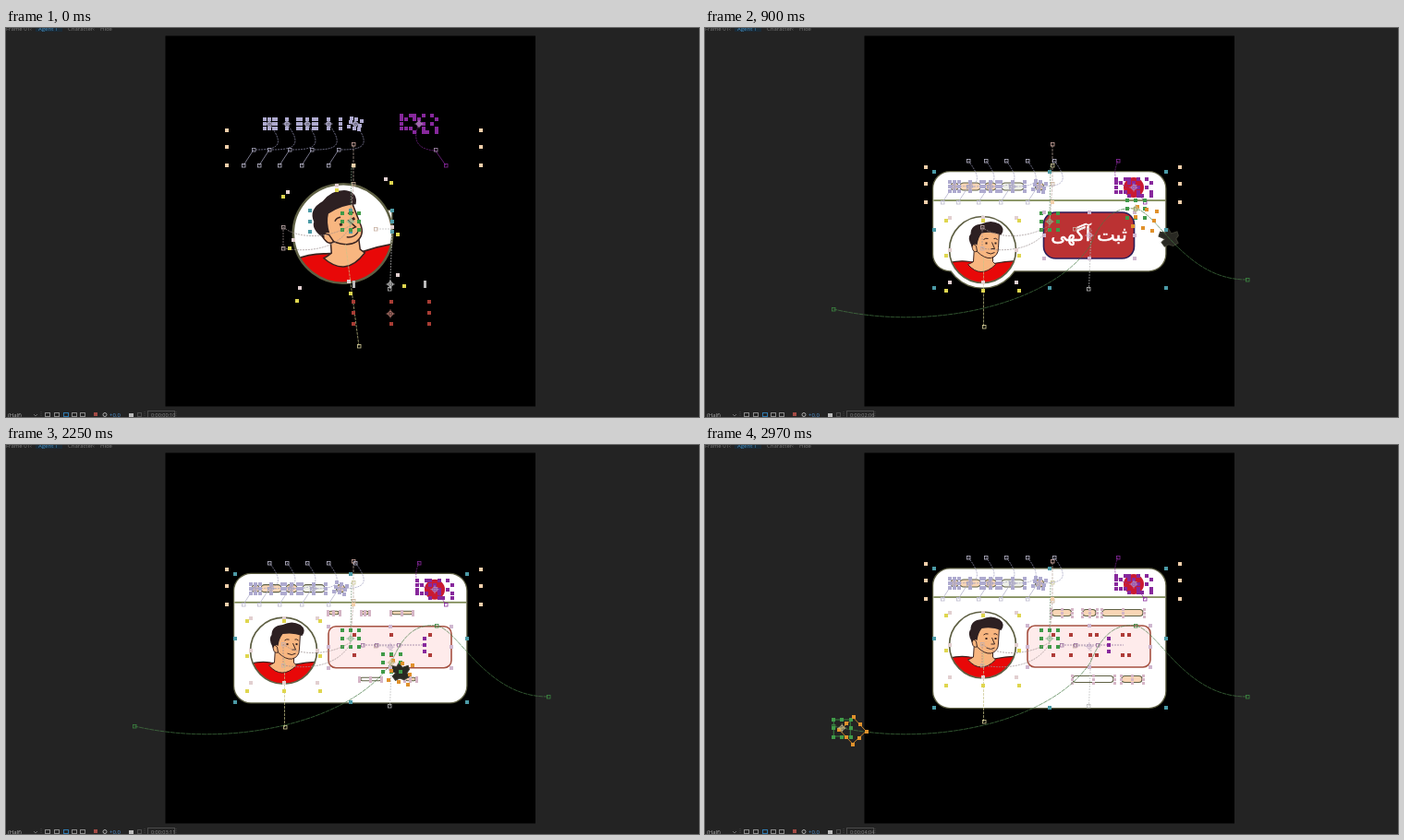
These frames come from a looping animation (750x422 px, 3.09 s). An HTML page with a canvas:

```html
<!DOCTYPE html>
<html lang="en">
<head>
<meta charset="utf-8">
<title>Card animation preview</title>
<style>
html, body { margin: 0; width: 100%; height: 100%; overflow: hidden; background: #232323; }
canvas { display: block; }
</style>
</head>
<body>
<canvas id="stage" width="750" height="422"></canvas>
<script>
const ctx = document.getElementById('stage').getContext('2d');
const LOOP = 3090, LAST = 2970, STEP = 30;
const OLIVE = '#5f6044', PEACH = '#f9d6b6', LILAC = '#aeaacf', PURPLE = '#87289c', GREEN = '#3f9a48', ORANGE = '#e0912b';
const TAU = Math.PI * 2;

const clamp = v => Math.max(0, Math.min(1, v));
const mix = (a, b, p) => a + (b - a) * p;
const linear = p => p;
const smooth = p => p * p * (3 - 2 * p);
const quadInOut = p => p < .5 ? 2 * p * p : 1 - 2 * (1 - p) ** 2;
const cubicOut = p => 1 - (1 - p) ** 3;
const ramp = (t, start, length, ease = smooth) => ease(clamp((t - start) / length));
const blend = (a, b, p) => `rgb(${a.map((v, i) => Math.round(mix(v, b[i], p)))})`;

// Value between [time, value] keys.
function track(t, keys, ease = smooth) {
  if (t <= keys[0][0]) return keys[0][1];
  for (let i = 1; i < keys.length; i++) {
    const [t0, a] = keys[i - 1], [t1, b] = keys[i];
    if (t < t1) return mix(a, b, ease((t - t0) / (t1 - t0)));
  }
  return keys[keys.length - 1][1];
}

function bezier([a, b, c, d], u) {
  const v = 1 - u;
  return [0, 1].map(k => v * v * v * a[k] + 3 * v * v * u * b[k] + 3 * v * u * u * c[k] + u * u * u * d[k]);
}

function dot(x, y, color, size = 4) {
  ctx.fillStyle = color;
  ctx.fillRect(Math.round(x - size / 2), Math.round(y - size / 2), size, size);
}

function hollow(x, y, color) {
  ctx.strokeStyle = color;
  ctx.lineWidth = .8;
  ctx.strokeRect(Math.round(x) - 1.5, Math.round(y) - 1.5, 3.5, 3.5);
}

function anchor(x, y, color = '#ccc') {
  ctx.strokeStyle = color;
  ctx.lineWidth = .9;
  ctx.beginPath();
  ctx.arc(x, y, 2.5, 0, TAU);
  ctx.moveTo(x - 4.5, y); ctx.lineTo(x + 4.5, y);
  ctx.moveTo(x, y - 4.5); ctx.lineTo(x, y + 4.5);
  ctx.stroke();
}

// Eight handles around a box, optionally turned.
function handles(cx, cy, rx, ry, color, size = 4, turn = 0) {
  const c = Math.cos(turn), s = Math.sin(turn);
  for (let i = -1; i < 2; i++) for (let j = -1; j < 2; j++) {
    if (i || j) dot(cx + i * rx * c - j * ry * s, cy + i * rx * s + j * ry * c, color, size);
  }
}

function line(points, color, dash = []) {
  ctx.strokeStyle = color;
  ctx.lineWidth = .7;
  ctx.setLineDash(dash);
  ctx.beginPath();
  points.forEach(([x, y]) => ctx.lineTo(x, y));
  ctx.stroke();
  ctx.setLineDash([]);
}

function route(curve, color, dash = [2, 1]) {
  line(Array.from({ length: 31 }, (_, i) => bezier(curve, i / 30)), color, dash);
}

function rounded(x, y, w, h, r) {
  ctx.beginPath();
  ctx.roundRect(x, y, w, h, Math.min(r, w / 2, h / 2));
}

function pill(x, y, w, h, fill = PEACH) {
  rounded(x - w / 2, y - h / 2, w, h, h / 2);
  ctx.fillStyle = fill;
  ctx.fill();
  ctx.strokeStyle = OLIVE;
  ctx.lineWidth = 1.2;
  ctx.stroke();
}

function label(text, x, y, color, font = '6px "Open Sans", sans-serif') {
  ctx.font = font;
  ctx.fillStyle = color;
  ctx.textAlign = 'left';
  ctx.textBaseline = 'alphabetic';
  ctx.fillText(text, x, y);
}

function shape(path, fill, stroke, width = 1.2) {
  const p = new Path2D(path);
  if (fill) { ctx.fillStyle = fill; ctx.fill(p); }
  if (stroke) { ctx.strokeStyle = stroke; ctx.lineWidth = width; ctx.stroke(p); }
}

function drawWorkspace(t) {
  ctx.fillStyle = '#232323';
  ctx.fillRect(0, 0, 750, 422);
  ctx.fillStyle = '#000';
  ctx.fillRect(172.5, 8.5, 400.5, 402);

  ctx.fillStyle = '#1a2a36';
  ctx.fillRect(32, 0, 29, 4);
  label('Frame 01', 0, 3, '#777');
  label('‹', 26, 3, '#777');
  label('Agent 1', 35, 3, '#4590c4');
  label('Character', 67, 3, '#777');
  label('‹', 94, 3, '#777');
  label('Hide', 102, 3, '#777');

  label('(Half)', 2, 422, '#aaa');
  line([[30, 419], [32, 421], [34, 419]], '#888');
  [38, 150, 184].forEach(x => line([[x, 416], [x, 422]], '#555', [1, 1]));
  [45, 55, 65, 74, 83].forEach((x, i) => {
    ctx.strokeStyle = i === 2 ? '#2f78ad' : '#8a8a8a';
    ctx.lineWidth = 1;
    ctx.strokeRect(x - 2.5, 417.5, 5, 4);
  });
  dot(97, 419, '#a44a44', 4);
  ctx.beginPath();
  ctx.arc(107, 419.5, 2, 0, TAU);
  ctx.strokeStyle = '#aaa';
  ctx.stroke();
  label('+0.0', 112, 422, '#4d8fd0');
  dot(135, 420, '#bbb', 5);
  ctx.strokeStyle = '#4a4a4a';
  ctx.strokeRect(142.5, 417.5, 4, 4);
  ctx.strokeRect(153.5, 415.5, 29, 8);
  const n = Math.round(track(t, [[0, 10], [480, 41], [720, 52], [900, 66], [1590, 80], [1950, 92], [2430, 106], [2970, 124]], linear));
  label(`0:00:0${Math.floor(n / 30)}:${String(n % 30).padStart(2, '0')}`, 157, 421.5, '#888', '5.5px "Open Sans", sans-serif');
}

function drawMan(tilt) {
  const ink = '#3a2420', skin = '#f8b680';
  ctx.save();
  ctx.beginPath();
  ctx.arc(0, 0, 36, 0, TAU);
  ctx.fillStyle = '#fff';
  ctx.fill();
  ctx.clip();
  shape('M-40 15 Q-26 11 -14 13 L12 15 Q26 12 40 12 V40 H-40Z', '#e80808', ink);
  shape('M-9 -4 L-10 13 Q-13 15 -16 16 Q-2 32 14 16 L11 13 L11 2Z', skin, ink, 1);

  ctx.translate(3, 8);
  ctx.rotate(tilt);
  ctx.translate(-3, -8);
  shape('M-10 -18 Q-11 -4 -6 2 Q2 10 9 9 Q17 7 17 -2 L18 -19 Q3 -26 -10 -18Z', skin, ink, 1);
  shape('M-7 -4 Q-14 -10 -11 -1 Q-10 3 -6 2Z', skin, ink, 1);
  shape('M-12 -4 Q-17 -13 -13 -17 Q-13 -27 -1 -28 Q9 -33 18 -28 Q25 -23 20 -16 Q10 -20 -1 -18 Q-5 -13 -6 -5 Q-10 -8 -11 -3Z', '#2d2022');
  shape('M1 -11 Q3 -13 6 -12 M12 -12 Q14 -13 16 -11 M10 -8 L13 -1 L9 -1 M4 3 Q9 6 13 3', null, ink, 1);
  dot(4, -7, ink, 2);
  dot(14, -7, ink, 2);
  ctx.restore();
  ctx.beginPath();
  ctx.arc(0, 0, 36, 0, TAU);
  ctx.strokeStyle = OLIVE;
  ctx.lineWidth = 1.7;
  ctx.stroke();
}

const chipStarts = [285, 304, 326, 349, 378];
const chipEnds = [270, 287, 309, 333, 362];
const chipWidths = [8, 22, 12, 24, 9];
const chipRoute = (i, h) => {
  const s = chipStarts[i], e = chipEnds[i];
  return [[s, h - 43], [s + 20, h - 17], [e + 20, h - 15], [e, h - 15]];
};
const badgeRoute = h => [[447, h - 43], [437, h - 20], [452, h - 15], [464, h - 14]];

const trail = [
  [[587, 273], [520, 274], [490, 200], [466, 196]],
  [[466, 196], [440, 193], [427, 212], [417, 236]],
  [[417, 236], [375, 300], [245, 330], [139, 305]]
];
const along = v => {
  const i = Math.min(2, Math.floor(v));
  return bezier(trail[i], v - i);
};

// x, y, width, lag, fill
const details = [
  [386, 182, 21, 17, PEACH], [416, 182, 14, 13, PEACH], [452, 182, 44, 9, PEACH],
  [420, 254, 44, 11, '#fff'], [462, 254, 22, 10, PEACH]
];

// Seeded grid positions for the dense vertex cluster.
let seed = 11;
const random = () => (seed = seed * 16807 % 2147483647) / 2147483647;
const vertices = Array.from({ length: 30 }, () => [Math.round(random() * 8 - 4) * 4.7, Math.round(random() * 5 - 2.5) * 4.7]);

function pose(t) {
  const open = ramp(t, 2010, 360);
  const grow = ramp(t, 60, 270, cubicOut);
  const go = ramp(t, 60, 360);
  const line = track(t, [[0, 147], [90, 147], [520, 187]]) - 22 * open;
  const man = bezier([[364.5, 223], [350, 244], [325, 243], [300.5, 240.5]], go);
  man[1] -= 23.5 * open;
  const travel = start => track(t, [[300, .04], [720, .1], [899, .1], [900, start], [1410, 2]], linear) + ramp(t, 2310, 750, quadInOut);
  return {
    line, open, grow, man,
    manScale: mix(1.49, 1, go),
    manTurn: mix(-.13, 0, go),
    manTilt: mix(-.3, 0, go),
    cardW: mix(89, 251, grow),
    cardH: mix(23, mix(107, 150.5, open), grow),
    chips: chipEnds.map((_, i) => bezier(chipRoute(i, line), ramp(t, 336 + i * 34, 250, cubicOut))),
    badge: bezier(badgeRoute(line), ramp(t, 400, 270, cubicOut)),
    buttonW: track(t, [[270, 0], [420, 98], [1770, 98], [1950, 75], [2010, 75], [2250, 133]]),
    buttonH: track(t, [[270, 0], [420, 47], [570, 50], [1770, 50], [1950, 38], [2010, 38], [2250, 45]]),
    buttonY: track(t, [[270, 278], [480, 229], [570, 225], [2010, 225], [2310, 218.5]]),
    words: track(t, [[270, 0], [420, 1], [1770, 1], [1950, .59], [2070, 0]]),
    cursor: travel(1),
    glyph: travel(.67)
  };
}

function drawCard(p) {
  const top = 209.7 - p.cardH / 2, left = 372.7 - p.cardW / 2;
  const outline = () => {
    ctx.beginPath();
    ctx.roundRect(left, top, p.cardW, p.cardH, 18 * p.grow);
    const r = 41 * p.grow;
    ctx.moveTo(p.man[0] + r, p.man[1]);
    ctx.arc(p.man[0], p.man[1], r, 0, TAU);
  };
  outline();
  ctx.strokeStyle = OLIVE;
  ctx.lineWidth = 2.6;
  ctx.stroke();
  ctx.fillStyle = '#fff';
  ctx.fill();

  ctx.save();
  outline();
  ctx.clip();
  ctx.fillStyle = '#7a8751';
  ctx.fillRect(left, p.line - .8, p.cardW, 1.7);
  p.chips.forEach(([x, y], i) => pill(x, y, chipWidths[i], 8, i === 3 ? '#eef0e8' : PEACH));
  ctx.beginPath();
  ctx.arc(...p.badge, 11, 0, TAU);
  ctx.fillStyle = '#c91a32';
  ctx.fill();
  ctx.restore();
}

function drawButton(t, p) {
  if (p.buttonW < 1) return;
  const turn = ramp(t, 1990, 200);
  rounded(415.5 - p.buttonW / 2, p.buttonY - p.buttonH / 2, p.buttonW, p.buttonH, mix(13, 8, turn));
  ctx.fillStyle = blend([187, 50, 51], [254, 235, 235], turn);
  ctx.fill();
  ctx.strokeStyle = blend([45, 29, 89], [165, 82, 66], turn);
  ctx.lineWidth = 1.6;
  ctx.stroke();
  if (p.words > .02) {
    ctx.save();
    ctx.translate(415.5, p.buttonY);
    ctx.scale(p.words, p.words);
    ctx.font = '21px "DejaVu Sans", sans-serif';
    ctx.direction = 'rtl';
    ctx.textAlign = 'center';
    ctx.textBaseline = 'alphabetic';
    ctx.fillStyle = ctx.strokeStyle = '#fff';
    ctx.lineWidth = .5;
    ctx.fillText('ثبت آگهی', 0, 6);
    ctx.strokeText('ثبت آگهی', 0, 6);
    ctx.restore();
  }
}

function drawDetails(t) {
  const s = ramp(t, 2130, 240);
  if (!s) return;
  for (const [x0, y, w, lag, fill] of details) {
    const x = x0 - track(t, [[2100, lag + 25], [2430, lag], [2970, 0]]);
    pill(x, y, w * s, 7 * s, fill);
    handles(x, y, w * s / 2 + 1, 4 * s, '#d5b5c6', 3);
    dot(x, y, '#d5b5c6', 3);
  }
}

function drawGlyph(t, p) {
  if (t < 300) return;
  const [x, y] = along(p.glyph);
  ctx.save();
  ctx.beginPath();
  ctx.rect(172.5, 8.5, 400.5, 402);
  ctx.clip();
  ctx.translate(x + 9, y + 10);
  ctx.rotate(.15);
  shape('M-10 -5 L-4 -5 L-2 -10 L2 -5 L8 -8 L10 -4 L8 0 L11 4 L6 8 L1 7 L-3 10 L-7 6 L-4 2 L-11 0Z', '#292923', '#3b3b30', 1);
  ctx.restore();
}

function drawHeaderGuides(p) {
  const h = p.line;
  for (const y of [h - 36, h - 18, h + 2]) {
    dot(239, y, '#f2cfaa');
    dot(513.5, y, '#f2cfaa');
  }
  dot(376, h + 2, '#f2cfaa');
  chipEnds.forEach((e, i) => {
    const curve = chipRoute(i, h), [x, y] = p.chips[i];
    route(curve, '#9a98bb');
    line([[e - 2, h - 15], [e - 13, h + 2]], '#aaa8c4');
    hollow(curve[0][0], curve[0][1], '#bbb9cd');
    hollow(e - 2, h - 15, '#a5a3ba');
    hollow(e - 13, h + 2, '#bbb9cd');
    handles(x, y, chipWidths[i] / 2 + 1, 5, LILAC, 4, i === 4 ? .3 : 0);
    anchor(x, y, '#a7a3c6');
  });
  route(badgeRoute(h), PURPLE);
  line([[464, h - 15], [476, h + 2]], PURPLE);
  hollow(447, h - 43, PURPLE);
  hollow(465, h - 15, '#a98ab0');
  hollow(476, h + 2, PURPLE);
  vertices.forEach(([x, y]) => dot(p.badge[0] + x, p.badge[1] + y, PURPLE));
  anchor(...p.badge, '#b48abf');
}

function drawManGuides(p) {
  const [x, y] = p.man, s = p.manScale, c = Math.cos(p.manTurn), n = Math.sin(p.manTurn);
  const at = (u, v) => [x + s * (u * c - v * n), y + s * (u * n + v * c)];
  route([[300, 216], [315, 229], [350, 229], [373, 214]], '#9b8f8f');
  route([[300, 239], [330, 244], [360, 239], [373, 215]], '#9b8f8f');
  line([[300, 216], [300, 239]], '#9b8f8f', [2, 1]);
  hollow(300, 216, '#c5b0b0');
  hollow(300, 239, '#c5b0b0');
  line([at(1, 8), at(1, 83)], '#c9c48a', [3, 1]);
  hollow(...at(1, 83), '#d4cd98');
  handles(...at(0, 0), 36 * s, 35 * s, '#e2cfd0', 4, p.manTurn);
  handles(...at(0, 6), 39.5 * s, 38 * s, '#dfd64f', 4, p.manTurn);
}

function drawButtonGuides(t, p) {
  if (t < 240) {
    handles(416.5, 309, 41, 12, '#a83c34');
    anchor(416, 278);
    anchor(416, 310, '#c48077');
    ctx.fillStyle = '#bbb';
    ctx.fillRect(375, 274, 3, 8);
    ctx.fillRect(452, 274, 3, 8);
  }
  line([[401, 218], [418, 218], [415.5, 283]], '#bbb', [2, 1]);
  hollow(400, 218, '#c8b0a0');
  hollow(415, 283, '#bbb');
  if (p.buttonW > 5) {
    handles(415.5, p.buttonY, p.buttonW / 2, p.buttonH / 2, '#cfb7d0');
    anchor(416, p.buttonY, '#cfb7d0');
  }
  if (t >= 2200) {
    for (const y of [206, 228]) {
      [377, 417, 459].forEach(x => dot(x, y, '#ae3c38'));
      if (t >= 2580) [396, 424, 452].forEach(x => dot(x, y, '#ae3c38'));
    }
    line([[386, 217], [453, 217]], '#8b709a', [2, 1]);
    [386, 401, 425].forEach(x => hollow(x, 217, '#9a719f'));
    const x = track(t, [[2430, 453], [2970, 437]]);
    for (const y of [210, 217, 224]) dot(x, y, PURPLE);
  }
}

function drawCardGuides(p) {
  const top = 209.7 - p.cardH / 2;
  const bottom = Math.max(209.7 + p.cardH / 2, p.grow > .8 ? p.man[1] + 41 : 0);
  handles(373, (top + bottom) / 2, p.cardW / 2, (bottom - top) / 2, '#4b9aa6');
  line([[376, 127], [376, 169], [373, 210]], '#b9a79c', [3, 1]);
  line([[374, 149], [373, 201]], '#7a9a7c', [2, 1]);
  hollow(376, 126, '#cfa8a0');
  hollow(376, 149, '#c9c595');
  hollow(376, 169, '#c9b09a');
  handles(373, 210, 9, 9, GREEN);
  anchor(373, 210, '#8eb894');
}

function drawCursorGuides(t, p) {
  if (t < 300) return;
  trail.forEach(curve => route(curve, '#477a45', [5, .7]));
  [[587, 273], [466, 196], [139, 305]].forEach(([x, y]) => hollow(x, y, '#3a8540'));
  const [x, y] = along(p.cursor);
  const leaving = ramp(t, 2430, 540);
  const entering = t < 900;
  const turn = mix(.24, -.75, leaving);
  const ox = x + mix(10, 12, leaving), oy = y + (entering ? -3 : mix(11, 3, leaving));
  if (entering || leaving > .85) {
    ctx.save();
    ctx.translate(ox, oy);
    ctx.rotate(turn);
    ctx.strokeStyle = ORANGE;
    ctx.lineWidth = .8;
    ctx.strokeRect(-10, -10, 20, 20);
    ctx.restore();
    ctx.strokeStyle = GREEN;
    ctx.lineWidth = .8;
    ctx.strokeRect(x - 9, y - 9, 18, 18);
  }
  handles(x, y, 9.5, 9.5, GREEN);
  handles(ox, oy, 10.5, 10.5, ORANGE, 4, turn);
  anchor(x, y, '#c8bd8d');
}

function render(t) {
  const p = pose(t);
  drawWorkspace(t);
  drawCard(p);
  ctx.save();
  ctx.translate(...p.man);
  ctx.rotate(p.manTurn);
  ctx.scale(p.manScale, p.manScale);
  drawMan(p.manTilt);
  ctx.restore();
  drawButton(t, p);
  drawDetails(t);
  drawGlyph(t, p);
  drawCardGuides(p);
  drawHeaderGuides(p);
  drawManGuides(p);
  drawButtonGuides(t, p);
  drawCursorGuides(t, p);
}

const begin = performance.now();
function tick() {
  const t = (performance.now() - begin) % LOOP;
  render(Math.min(LAST, Math.floor(t / STEP) * STEP));
  requestAnimationFrame(tick);
}
tick();
</script>
</body>
</html>
```
